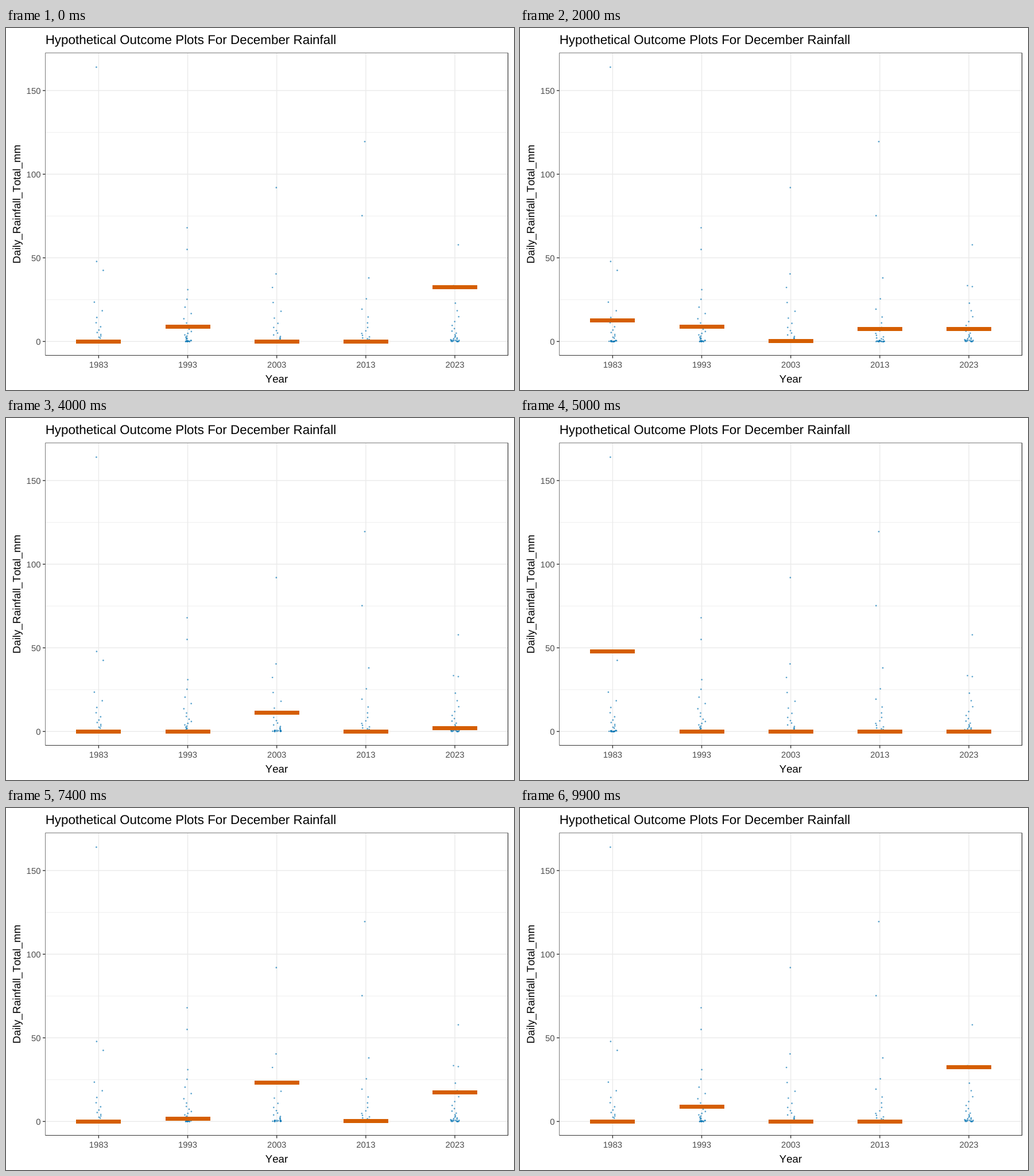
Write an HTML page that moves like this. It is 885x632 px and loops after 10 s.

```html
<!DOCTYPE html>
<html lang="en">
<head>
<meta charset="utf-8">
<title>December Rainfall</title>
<style>
  html, body { margin: 0; width: 100%; height: 100%; overflow: hidden; background: #fff; }
  svg { display: block; width: 885px; height: 632px; }
  text {
    font-family: "Liberation Sans", Arial, sans-serif;
    font-kerning: none;
    text-rendering: geometricPrecision;
  }
</style>
</head>
<body>
<svg id="chart" viewBox="0 0 885 632"></svg>
<script>
const chart = document.getElementById("chart");
const LEFT = 68.5, RIGHT = 874.5, TOP = 43.5, BOTTOM = 571.5;
const BAR_W = 78, BAR_H = 7, JITTER = 7.5, DAYS = 31;
const FRAME_MS = 100, FRAMES = 100, FRAMES_PER_DRAW = 5, DRAWS = 20;
const GRID = "#ebebeb", AXIS = "#333", TICK_TEXT = "#4d4d4d";

const colX = i => 161.4 + 155.15 * i;
const valY = v => 547.3 - 2.92 * v;

// storms: heaviest days as [x offset, mm]; wet days fall off geometrically
// from max to min; every other day is dry.
// draws: the rain drawn by number of draw, zero where none is given.
const columns = [
  { year: 1983, storms: [[-4, 164], [-3.5, 47.8], [8, 42.5]],
    wet: 11, max: 23.5, min: 2,
    draws: { 3: 164.2, 4: 12.5, 5: 12.5, 10: 47.8, 17: 5.8, 18: 5.8, 19: 23.3 } },
  { year: 1993, storms: [[-1, 68], [-1, 55]],
    wet: 16, max: 31, min: 1.4,
    draws: { 0: 8.7, 1: 31, 4: 8.7, 5: 54.7, 11: 30.4, 15: 1.5, 18: 4.6 } },
  { year: 2003, storms: [[-0.8, 92], [-1.2, 40.4], [-7.5, 32.3]],
    wet: 12, max: 23.3, min: 1.4,
    draws: { 4: 0.4, 8: 11.2, 12: 2.5, 15: 23.1, 18: 4.9 } },
  { year: 2013, storms: [[-1.8, 119.5], [-6.5, 75.2], [5.2, 38]],
    wet: 12, max: 25.5, min: 1.2,
    draws: { 4: 7.4, 12: 2.4, 15: 0.4, 18: 0.9 } },
  { year: 2023, storms: [[6, 57.8], [-2.4, 33.4], [6, 32.8]],
    wet: 17, max: 22.9, min: 0.7,
    draws: { 0: 32.5, 4: 7.6, 8: 2, 9: 57.4, 13: 7.7, 15: 17.3, 17: 32.4, 18: 3 } }
];

function add(tag, attrs, content) {
  const el = document.createElementNS("http://www.w3.org/2000/svg", tag);
  for (const key in attrs) el.setAttribute(key, attrs[key]);
  if (content !== undefined) el.textContent = content;
  chart.append(el);
  return el;
}

function path(d, stroke, width) {
  add("path", { d, stroke, "stroke-width": width, fill: "none" });
}

function label(x, y, size, content, anchor = "middle", fill = "#000", turn = 0) {
  add("text", {
    transform: `translate(${x} ${y}) rotate(${turn})`,
    "font-size": size, "text-anchor": anchor, fill
  }, content);
}

function dot(cx, cy) {
  add("circle", { cx, cy, r: 1.35, fill: "#0072b2", "fill-opacity": 0.65 });
}

let seed = 7;
function random() {
  seed = (seed * 16807) % 2147483647;
  return seed / 2147483647;
}
const spread = size => (2 * random() - 1) * size;

function drawDays({ storms, wet, max, min }, x) {
  for (const [dx, mm] of storms) dot(x + dx, valY(mm));
  for (let k = 0; k < wet; k++) {
    dot(x + spread(JITTER), valY(max * (min / max) ** (k / (wet - 1))));
  }
  for (let k = storms.length + wet; k < DAYS; k++) {
    dot(x + 0.5 + spread(JITTER), valY(0.25) + spread(1.2));
  }
}

// grid
for (let mm = 0; mm <= 150; mm += 25) {
  path(`M${LEFT} ${valY(mm)}H${RIGHT}`, GRID, mm % 50 ? 0.8 : 1.5);
}
columns.forEach((c, i) => path(`M${colX(i)} ${TOP}V${BOTTOM}`, GRID, 1.5));

// data
columns.forEach((c, i) => drawDays(c, colX(i)));
const bars = columns.map((c, i) => add("rect", {
  x: Math.round(colX(i) - BAR_W / 2), width: BAR_W, height: BAR_H, fill: "#d55e00"
}));

// panel border, lighter at the left and top
path(`M${LEFT} ${BOTTOM}V${TOP}H${RIGHT}`, "#7a7a7a", 1);
path(`M${LEFT} ${BOTTOM}H${RIGHT}V${TOP}`, AXIS, 1.2);

// axes and titles
for (let mm = 0; mm <= 150; mm += 50) {
  path(`M${LEFT - 4.5} ${valY(mm)}H${LEFT}`, AXIS, 1.4);
  label(60.5, valY(mm) + 5.6, 14.93, mm, "end", TICK_TEXT);
}
columns.forEach((c, i) => {
  path(`M${colX(i)} ${BOTTOM}v5`, AXIS, 1.4);
  label(colX(i), 593, 14.93, c.year, "middle", TICK_TEXT);
});
label(68.7, 28.3, 22.4, "Hypothetical Outcome Plots For December Rainfall", "start");
label(471.5, 619, 18.67, "Year");
label(25.3, 307.5, 18.67, "Daily_Rainfall_Total_mm", "middle", "#000", -90);

// Each draw holds, then passes one halfway frame; the middle draw is a frame shorter.
function render(ms) {
  const frame = Math.floor(ms / FRAME_MS) % FRAMES;
  const pos = frame < FRAMES / 2 ? frame : frame + 1;
  const draw = Math.floor(pos / FRAMES_PER_DRAW);
  const mix = pos % FRAMES_PER_DRAW === FRAMES_PER_DRAW - 1 ? 0.5 : 0;
  columns.forEach(({ draws }, i) => {
    const from = draws[draw % DRAWS] || 0;
    const to = draws[(draw + 1) % DRAWS] || 0;
    const y = valY(from + (to - from) * mix) - BAR_H / 2;
    bars[i].setAttribute("y", Math.round(y));
  });
}

const start = performance.now();
function tick() {
  render(performance.now() - start);
  requestAnimationFrame(tick);
}
tick();
</script>
</body>
</html>
```
